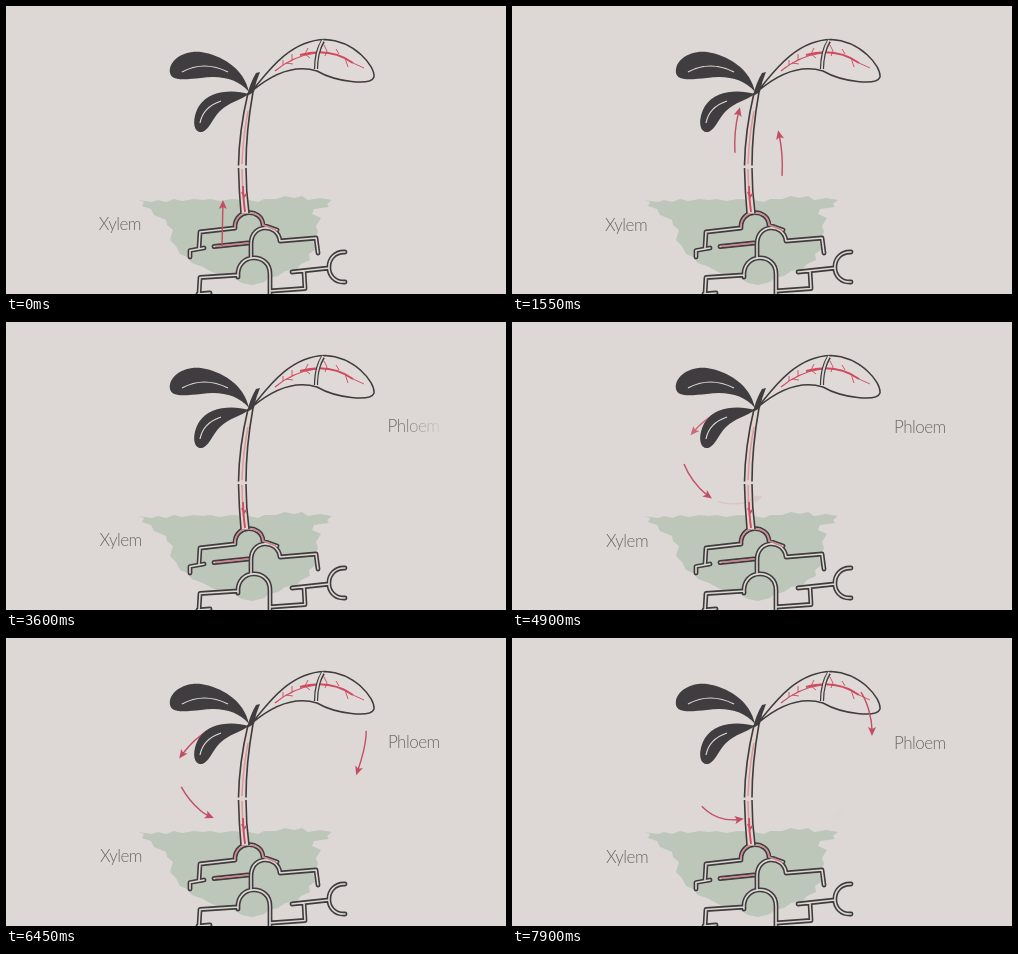
Animation, 500 px wide and 288 px high, one loop 7950 ms. Source, as an HTML page:

```html
<!DOCTYPE html>
<html lang="en">
<head>
<meta charset="utf-8">
<title>Xylem and phloem</title>
<style>
html, body { margin: 0; width: 100%; height: 100%; overflow: hidden; background: #ddd8d5; }
svg { display: block; width: 500px; height: 288px; }
path { fill: none; }
text { font: 300 17px Lato, "Open Sans", sans-serif; letter-spacing: -.5px; fill: #6b6766; }
.ink { stroke: #3f3c3d; }
.dark { fill: #3f3d3f; }
.light { stroke: #ded8d5; }
.pink { stroke: #cf4a5e; }
#roots { stroke-linejoin: round; stroke-linecap: round; }
#arrows path { stroke: #c44d62; stroke-width: 1.4; }
#arrows polygon { fill: #c44d62; }
</style>
</head>
<body>
<svg viewBox="0 0 500 288">
  <defs>
    <path id="roots" d="M229 222L194 226L193 242M198 242L184 244.500V251M229 222C228 202 256 202 257 219L271 224M208 240.500L242 237M245 251V238C245 217 272 217 274 235L310 232L312 247M232 269L194 271.500L193 288M204 287L192 288M232 271C230 246 264 246 264 268V290M264 285L299 282.500L298 265M286 266L323 262M339 246C318 245 317 277 339 276"/>
    <linearGradient id="wipe" gradientUnits="userSpaceOnUse" x1="0" x2="50">
      <stop stop-color="#fff"/><stop offset="1" stop-color="#000"/>
    </linearGradient>
    <mask id="reveal" maskUnits="userSpaceOnUse" x="360" y="80" width="100" height="50">
      <rect x="360" y="80" width="100" height="50" fill="url(#wipe)"/>
    </mask>
  </defs>

  <!-- soil -->
  <path style="fill:#bcc7ba" d="M132 194L146 196 152 194 160 196 168 193 176 195 188 193 197 194 204 193 214 195 226 193 242 194 252 196 258 193 270 193 279 190 288 192 296 190 302 194 314 192 326 194 321 198 323 201 308 203 306 208 315 212 310 220 312 226 307 236 310 243 303 248 304 254 295 258 291 263 279 265 272 270 263 272 258 276 246 279 236 277 226 271 214 270 204 265 197 261 186 257 181 251 174 248 170 240 164 234 167 224 161 219 160 214 148 209 145 203 136 200 138 196Z"/>

  <!-- roots -->
  <use href="#roots" class="ink" stroke-width="4.800"/>
  <use href="#roots" class="light" stroke-width="1.600"/>
  <path class="pink" opacity=".6" stroke-width="1.4" d="M229 222C228 202 256 202 257 219L270 224M209 240.500L242 237"/>

  <!-- stem -->
  <path style="fill:#e0d3d0" d="M242 87Q233 125 232.500 160L235 207H243L240 160Q240 125 247 86Z"/>
  <path class="ink" stroke-width="1.600" d="M242 87Q233 125 232.500 159.500M247 86Q240 125 240 159.500M232.500 162Q233 185 235 207M240 162Q240 185 243 207"/>
  <path stroke="#d99a9c" stroke-width="1.500" d="M242 105Q237 130 236 158M236 163Q236 185 239 206"/>
  <path class="pink" stroke-width="1.800" d="M237 180Q237 192 239 206M236 186L238 191 240 188"/>

  <!-- right leaf -->
  <path class="dark" d="M241 90Q244 77 250 67L254 66Q250 75 248 86Z"/>
  <path class="ink" style="fill:#dfdad7" stroke-width="1.500" d="M246 85C260 68 283 34 319 33.500C349 35 369 60 368 71C365 80 330 76 311 65C292 59 271 64 246 85Z"/>
  <path class="pink" stroke-width="1.200" d="M269 65Q287 50 310 47"/>
  <path class="pink" stroke-width="2" d="M294 49Q324 41 347 57"/>
  <path class="pink" stroke-width=".9" d="M347 57L358 62M277 59L277 54M286 54L286 48M299 48L302 42M321 45L318 39M333 48L330 43M280 57L287 58M299 48L304 52M321 45L319 50M339 52L342 61"/>
  <path class="ink" stroke-width="4.200" d="M317 35Q310 46 310 63"/>
  <path class="light" stroke-width="1.800" d="M317 34Q310 46 310 64"/>

  <g id="arrows"></g>

  <!-- dark leaves -->
  <path class="dark" d="M243 86C238 62 215 49 195 46C177 44 162 55 164 67C166 76 181 73 195 72C215 69 232 73 243 86Z"/>
  <path class="dark" d="M243 88C225 83 203 85 193 100C186 112 187 125 194 126C202 127 206 113 214 105C223 96 235 94 243 88Z"/>
  <path class="light" stroke-width="1.200" d="M176 66Q198 54 222 66M194 117Q197 101 215 95"/>

  <text id="xylem" x="93.500" y="224">Xylem</text>
  <g mask="url(#reveal)"><text id="phloem" x="381.500" y="110">Phloem</text></g>
</svg>
<script>
const LOOP = 7950, SIZE = 46;
const $ = id => document.getElementById(id);
const clamp = v => Math.max(0, Math.min(1, v));

function track(d) {
  const path = document.createElementNS("http://www.w3.org/2000/svg", "path");
  path.setAttribute("d", d);
  return { d, path, length: path.getTotalLength() };
}

const upLeft = track("M216 241L217 194C218 172 221 160 223 148C222 132 224 114 228 101L240 64");
const upRight = track("M278 218C275 200 272 188 270 171C271 154 270 140 266 124L254 66");
const leafLeft = track("M212 87Q188 98 173 121");
const sideLeft = track("M172 142C176 152 184 164 195 173S218 183 231 181L252 174");
const sideRight = track("M346 50C356 62 361 84 360 98S349 149 335 166L320 184");

// Piecewise linear value through [time, value] pairs.
function ramp(keys, t) {
  if (t <= keys[0][0]) return keys[0][1];
  for (let i = 1; i < keys.length; i++) {
    const [a, u] = keys[i - 1], [b, v] = keys[i];
    if (t < b) return u + (v - u) * (t - a) / (b - a);
  }
  return keys.at(-1)[1];
}

function arrow(line, tip, alpha, tail = tip - SIZE) {
  if (tip < 4 || tip > line.length + 1 || alpha <= 0) return "";
  tail = Math.max(0, tail);
  const p = line.path.getPointAtLength(tip), q = line.path.getPointAtLength(tip - 7);
  const angle = Math.atan2(p.y - q.y, p.x - q.x) * 180 / Math.PI;
  return `<g opacity="${clamp(alpha)}">
    <path d="${line.d}" stroke-dasharray="0 ${tail} ${Math.max(0, tip - 5 - tail)} 999"/>
    <polygon points="0,0 -9,-4 -7,0 -9,4" transform="translate(${p.x} ${p.y}) rotate(${angle})"/></g>`;
}

function rising(t) {
  return [0, 800, 2000].map(start => {
    const s = 0.125 * (t - start);
    return arrow(upLeft, 47 + s, (upLeft.length - 47 - s) / 25)
         + arrow(upRight, 1 + s, (upRight.length - 1 - s) / 25);
  }).join("");
}

function falling(t) {
  return [3990, 4790, 5515, 6310, 7105, 7900].map((start, i) => {
    const p = t - start;
    let out = "";
    if (p > 0) {
      out += arrow(leafLeft, ramp([[0, 12], [110, 43], [135, 52]], p), Math.min(p / 140, (700 - p) / 400),
        ramp([[0, 0], [135, 8], [245, 14], [700, 40]], p));
      out += arrow(sideLeft, ramp([[0, 10], [135, 53], [245, 69], [795, 78], [930, 101]], p),
        Math.min(p / 60, (925 - p) / 125));
    }
    if (i > 1 && p > -160)
      out += arrow(sideRight, ramp([[-160, 5], [0, 51], [135, 90], [245, 124], [795, 145]], p), (800 - p) / 500);
    return out;
  }).join("");
}

function draw(now) {
  const t = Math.floor(now % LOOP / 50) * 50;
  $("arrows").innerHTML = rising(t) + falling(t);
  const wave = (time, period) => Math.cos(2 * Math.PI * time / period);
  const sway = `translate(${wave(t - 7900, 1500) - 0.6} ${0.3 - 0.5 * wave(t, 3100)})`;
  $("xylem").setAttribute("transform", sway);
  $("phloem").setAttribute("transform", sway);
  const edge = t < 3250 ? 300 : 381 + (t - 3250) * 0.17;
  $("wipe").setAttribute("x1", edge - 50);
  $("wipe").setAttribute("x2", edge);
}

const begin = performance.now();
function tick() {
  draw(performance.now() - begin);
  requestAnimationFrame(tick);
}
tick();
</script>
</body>
</html>
```
